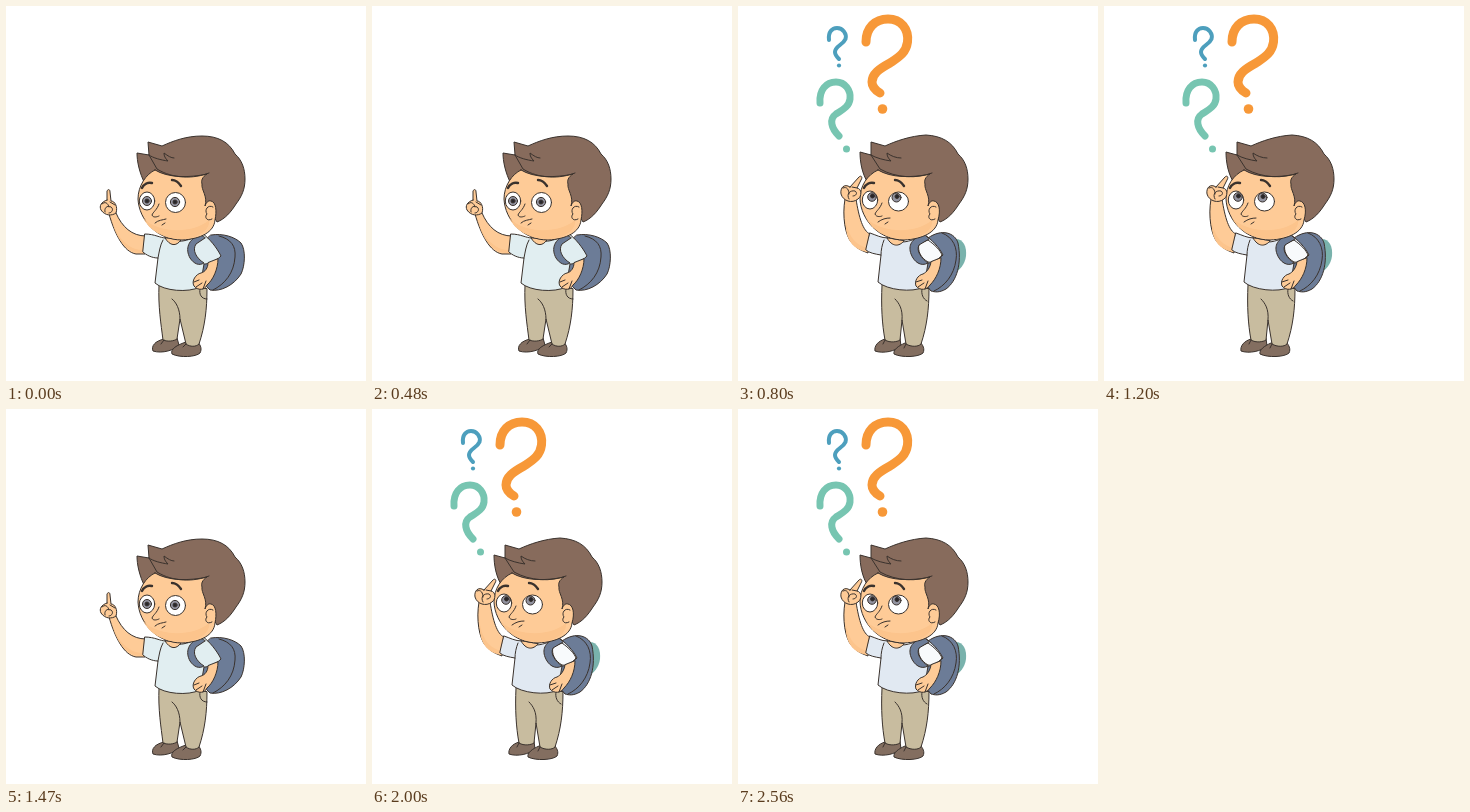
An HTML page for the animation above (2930 ms loop, 360x375 px).

```html
<!DOCTYPE html>
<html lang="en">
<head>
<meta charset="utf-8">
<title>Thinking boy</title>
<style>
html, body { margin: 0; width: 100%; height: 100%; overflow: hidden; background: #fff; }
svg { display: block; width: 360px; height: 375px; }
.ink path, .ink ellipse, .ink circle { stroke: #3a322d; stroke-width: 1; stroke-linecap: round; stroke-linejoin: round; }
.ink .flat { stroke: none; }
.ink .brow { fill: none; stroke-width: 2.4; }
.line { fill: none; }
.skin { fill: #fecb97; }
.shade { fill: #fcc48c; }
.hair { fill: #876b5c; }
.pack { fill: #6c7c97; }
.pants { fill: #c8bc9f; }
.shoe { fill: #836e60; }
.white { fill: #fff; }
.iris { fill: #9293a0; }
.pupil { fill: #26262c; }
.marks path { fill: none; stroke-linecap: round; }
</style>
</head>
<body>
<svg viewBox="0 0 360 375">
  <g id="point" class="ink">
    <path class="pack" d="M205 229C217 227 229 231 235 237C240 244 239 260 235 268C228 279 215 286 204 284C194 275 187 263 188 244Z"/>
    <path class="line" d="M213 230C225 233 230 240 229 251C228 267 219 278 207 284"/>
    <path class="shoe" d="M158 333C149 335 145 340 147 345C156 348 169 344 173 339L171 332Z"/>
    <path class="shoe" d="M180 336C171 339 164 343 166 348C174 352 190 351 194 347C196 343 195 340 192 336Z"/>
    <path class="pants" d="M153 279C152 300 155 318 157 334C162 336 168 335 171 333L174 313L180 338C184 341 190 341 193 338C199 320 201 303 201 283Z"/>
    <path class="line" d="M174 313C174 303 170 296 166 293M194 283C193 288 195 293 201 293M158 334L155 338M180 338L177 341"/>
    <path class="skin" d="M103 208C109 229 118 246 130 248L139 248L140 230C126 230 116 221 110 207Z"/>
    <path class="shade flat" d="M106 215C111 231 122 244 137 244L137 247C120 248 110 231 106 215Z"/>
    <path class="skin" d="M101 194L101 185C102 183 104 183 104 186L105 195C109 195 112 201 110 207C106 210 99 210 95 204C93 200 95 196 101 194Z"/>
    <path class="line" d="M96 198C99 195 102 197 103 201M99 206C98 202 101 199 105 201C108 203 106 207 103 207M104 196L109 199"/>
    <path fill="#e1eef1" d="M139 228C149 228 154 232 160 232C170 239 186 234 196 227C204 233 211 242 215 250C209 256 203 258 198 258L194 281C182 287 158 285 149 277L152 252C146 252 140 249 137 246Z"/>
    <path class="line" d="M157 234C154 239 153 247 152 252"/>
    <path class="skin" d="M159 232C164 240 170 241 175 234Z"/>
    <path class="pack" d="M194 229C182 233 179 243 184 252C188 258 193 260 198 257C190 252 186 244 190 238L199 232Z"/>
    <path class="skin" d="M202 257C202 262 199 266 195 267C190 268 185 275 188 280C192 285 199 284 201 279C207 274 212 263 212 253Z"/>
    <path class="line" d="M188 276L193 274M190 281L196 277M197 283L200 275"/>
    <g>
      <path class="hair" d="M139 178C133 166 131 155 131 147L143 149L142 136L156 140C167 135 180 130 196 130C212 130 223 136 229 148C236 154 239 163 239 173C239 183 236 190 230 198C225 206 219 213 211 216L203 202Z"/>
      <path class="skin" d="M149 164C140 168 132 180 132 193C133 214 151 234 176 234C195 233 208 226 209 214C211 205 210 196 205 195C202 194 200 197 199 200C202 190 195 184 196 178C195 175 196 171 201 168C183 172 162 172 149 164Z"/>
      <path class="shade flat" d="M137 212C153 228 187 228 203 214C205 227 185 234 174 233C156 232 144 225 137 212Z"/>
      <path class="line" d="M143 149L151 163C167 173 188 173 203 167M143 149C147 152 155 154 162 155C159 152 158 150 158 147C162 150 165 152 168 152"/>
      <path class="line" d="M207 201C202 198 198 204 201 208C198 211 201 216 206 213"/>
      <path class="brow" d="M136 182C138 178 142 176 146 177M166 174C170 174 173 177 175 180"/>
      <ellipse class="white" cx="141" cy="195" rx="7.7" ry="9"/>
      <ellipse class="white" cx="169.500" cy="196.500" rx="10" ry="10"/>
      <circle class="iris" cx="141" cy="195" r="4.500"/><circle class="pupil" cx="141" cy="195" r="2"/>
      <circle class="iris" cx="169" cy="196" r="4.600"/><circle class="pupil" cx="169" cy="196" r="2"/>
      <path class="line" d="M153 198C151 204 147 206 146 209C147 212 151 211 153 210M149 217C152 214 157 214 160 213M156 219L159 217"/>
    </g>
  </g>
  <g id="think">
    <g class="marks">
      <path stroke="#f79838" stroke-width="9" d="M128 36C128 22 137 13 150 13C163 13 171 23 169.500 36C168 47 161 51 152 57C141 63 134 68 134 76C134 81 137 84 142 87"/>
      <circle cx="144.500" cy="103" r="4.800" fill="#f79838"/>
      <path stroke="#77c5b1" stroke-width="7" d="M82 97C81 84 88 76 98 76C107 76 113 84 112 93C111 101 104 104 98 108C91 113 93 122 101 130"/>
      <circle cx="108.500" cy="143" r="3.500" fill="#77c5b1"/>
      <path stroke="#4d9fbd" stroke-width="4" d="M91 34C90 26 94 22 99 22C105 22 109 28 107.500 33C105 39 97 40 97 46C97 49 99 51 101 53"/>
      <circle cx="101" cy="59.500" r="2.100" fill="#4d9fbd"/>
    </g>
    <g class="ink">
      <path fill="#79b2ac" class="flat" d="M216 233C225 232 229 240 228 250C227 258 222 265 215 267Z"/>
      <path class="pack" d="M190 232C204 222 217 227 220 237C224 257 219 275 208 283C201 287 197 286 193 285C184 276 180 258 181 244Z"/>
      <path class="line" d="M204 227C215 231 220 242 218 254C216 269 207 280 196 285"/>
      <path class="shoe" d="M147 333C140 335 136 340 137 345C145 348 158 345 163 340L162 332Z"/>
      <path class="shoe" d="M167 337C160 340 155 344 156 348C164 352 181 351 185 347C187 343 185 339 182 336Z"/>
      <path class="pants" d="M144 279C143 300 144 318 147 334C152 337 159 336 162 334L164 314L168 338C173 341 180 341 183 338C189 320 191 303 191 283Z"/>
      <path class="line" d="M164 314C165 303 161 297 157 293M184 283C183 288 185 293 189 295M147 334L145 338M168 338L166 342"/>
      <path class="skin" d="M107 193C104 210 107 230 114 237C119 243 125 245 130 247L132 228C125 225 121 212 118 193Z"/>
      <path class="shade flat" d="M108 216C111 232 119 240 130 242L129 246C113 243 107 231 108 216Z"/>
      <path fill="#e1e9f2" d="M132 227C138 229 143 232 150 232C160 240 176 235 186 228C194 234 201 241 205 249C200 254 195 257 190 257L186 281C174 287 149 284 140 276L143 249C137 248 131 247 128 244Z"/>
      <path class="line" d="M146 234C144 239 143 244 143 249"/>
      <path class="skin" d="M149 232C154 241 161 241 166 235Z"/>
      <path fill="#f8fafc" d="M181 238L190 234C197 239 202 244 204 249C200 254 195 257 190 256C183 252 179 245 181 238Z"/>
      <path class="pack" d="M186 229C173 232 170 240 173 248C176 256 183 261 190 257C183 252 178 245 181 239L191 233Z"/>
      <path class="skin" d="M193 256C192 262 189 266 185 268C180 269 176 275 178 280C182 285 189 284 192 279C198 273 203 263 203 252Z"/>
      <path class="line" d="M178 276L184 274M180 281L186 277M187 283L190 275"/>
      <g>
        <path class="hair" d="M130 177C124 168 122 156 122 146L133 149L133 136L147 140C158 135 172 130 188 129C204 130 214 136 220 148C227 154 230 163 230 173C230 183 227 190 221 198C216 206 210 213 202 216L193 202Z"/>
        <path class="skin" d="M140 164C129 169 122 180 122 193C123 214 141 234 166 234C185 233 199 226 200 214C203 204 201 196 196 195C193 194 191 197 190 200C193 190 186 184 187 178C186 175 187 171 192 168C174 172 153 172 140 164Z"/>
        <path class="shade flat" d="M128 212C145 228 178 228 194 214C196 227 176 234 165 233C147 232 135 225 128 212Z"/>
        <path class="line" d="M133 149L142 163C158 172 179 173 194 167M133 149C138 152 146 154 153 155C150 152 149 150 149 147C153 150 158 152 163 152"/>
        <path class="line" d="M198 201C193 198 189 204 192 208C189 211 192 216 197 213"/>
        <path class="brow" d="M126 182C128 178 132 176 136 177M157 174C161 174 164 177 166 180"/>
        <ellipse class="white" cx="132" cy="194" rx="7.700" ry="9"/>
        <ellipse class="white" cx="160.500" cy="195.500" rx="10" ry="9.500"/>
        <circle class="iris" cx="134" cy="191" r="4.300"/><circle class="pupil" cx="134.500" cy="190" r="2"/>
        <circle class="iris" cx="158.500" cy="191.500" r="4.500"/><circle class="pupil" cx="159" cy="190.500" r="2"/>
        <path class="line" d="M144 197C142 203 138 205 137 208C138 211 142 211 144 210M140 216C144 213 148 212 152 212M147 218L150 216"/>
      </g>
      <path class="skin" d="M112 181L121 171C123 169 125 171 123 174L119 182C124 183 124 190 120 193C114 198 105 195 103 188C102 182 106 177 112 181Z"/>
      <path class="line" d="M105 182C109 180 111 184 111 188M111 193C108 188 112 184 117 185C120 187 118 190 115 190M114 181L119 182"/>
    </g>
  </g>
</svg>
<script>
const steps = [[800, "point"], [670, "think"], [530, "point"], [930, "think"]];
const loop = steps.reduce((sum, [ms]) => sum + ms, 0);
const poses = ["point", "think"].map(id => document.getElementById(id));
const start = performance.now();

function poseAt(t) {
  for (const [ms, id] of steps) {
    if (t < ms) return id;
    t -= ms;
  }
}

function draw(now) {
  const id = poseAt(Math.max(0, now - start) % loop);
  for (const g of poses) g.style.display = g.id === id ? "" : "none";
  requestAnimationFrame(draw);
}
draw(start);
</script>
</body>
</html>
```
